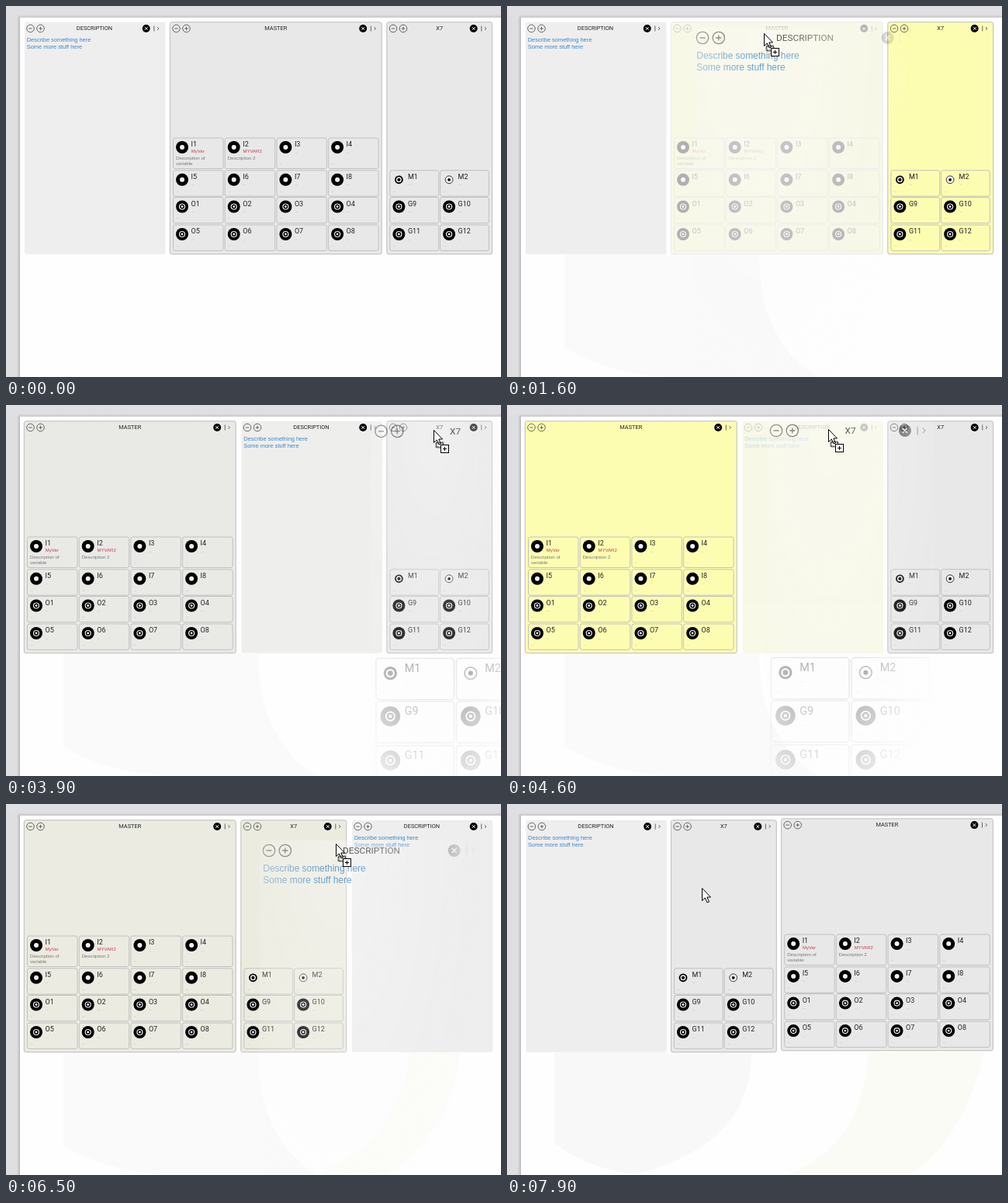
An HTML page for the animation above (8000 ms loop, 638 by 478 pixels).

```html
<!DOCTYPE html>
<html lang="en">
<head>
<meta charset="utf-8">
<title>Panel reordering</title>
<style>
  html, body { margin: 0; width: 100%; height: 100%; overflow: hidden; background: #dfdfe1; }
  svg { display: block; width: 638px; height: 478px; }
  text { font-family: Roboto, sans-serif; fill: #222; }
  .title { font-size: 7.4px; text-anchor: middle; }
  .label { font-size: 9px; }
  .note { font: 7.45px "Liberation Sans", Arial, sans-serif; fill: #3f86c4; }
  .var { font: 6px "Liberation Sans", Arial, sans-serif; fill: #bd3f4c; }
  .desc { font: 6.15px "Liberation Sans", Arial, sans-serif; fill: #777; }
  .dash { font: 5px "Liberation Sans", Arial, sans-serif; fill: #b4b4b4; }
</style>
</head>
<body>
<svg id="stage" viewBox="0 0 638 478">
  <defs>
    <clipPath id="pageClip"><rect x="18" y="15" width="620" height="463"/></clipPath>
    <radialGradient id="fade" gradientUnits="userSpaceOnUse" cx="0" cy="0" r="1">
      <stop offset="0" stop-color="#fff" stop-opacity=".85"/>
      <stop offset="1" stop-color="#fff" stop-opacity="0"/>
    </radialGradient>
    <mask id="ghostMask" maskUnits="userSpaceOnUse" x="-20" y="-20" width="500" height="540">
      <rect x="-20" y="-20" width="500" height="540" fill="url(#fade)"/>
    </mask>
    <linearGradient id="edgeX"><stop offset="0" stop-color="#dfdfe1"/><stop offset="1" stop-color="#b9b9bc"/></linearGradient>
    <linearGradient id="edgeY" x2="0" y2="1"><stop offset="0" stop-color="#e0e0e4"/><stop offset="1" stop-color="#c6c6c9"/></linearGradient>
  </defs>
  <rect width="638" height="478" fill="#dfdfe1"/>
  <rect width="638" height="11" fill="#e0e0e4"/>
  <rect x="14" y="14" width="4" height="464" fill="url(#edgeX)"/>
  <rect x="16" y="11" width="622" height="4" fill="url(#edgeY)"/>
  <rect x="18" y="15" width="620" height="463" fill="#fefefe"/>
  <g id="trails">
    <path d="M74 320V440Q130 474 210 478H400Q325 430 325 320Z" fill="#fafafa"/>
    <path d="M520 320H585Q575 420 490 478H400Q510 430 520 320Z" fill="#fcfcf8"/>
    <path d="M61 320V437Q105 470 165 477Q315 440 315 320Z" fill="#f8f8f8"/>
    <path d="M465 320H615Q590 430 520 478H360Q460 440 465 320Z" fill="#fbfbf6"/>
  </g>
  <g id="panels" clip-path="url(#pageClip)"></g>
  <g id="ghosts"></g>
  <g id="cursors">
    <path id="arrow" d="M0 0V16L3.8 12.5L6.6 18.5L9 17.5L6.3 11.5H11Z" fill="#fff" stroke="#000"/>
    <g id="drag">
      <path d="M0 0V16L3.8 12.5L6.6 18.5L9 17.5L6.3 11.5H11Z" fill="#fff" stroke="#000"/>
      <rect x="3" y="16" width="9" height="6" fill="none" stroke="#000" stroke-width="2" stroke-dasharray="1 1"/>
      <rect x="9" y="19" width="10" height="10" fill="#fff" stroke="#000"/>
      <path d="M11.5 24H16.5M14 21.5V26.5" stroke="#000"/>
    </g>
    <path id="beam" d="M-3 -8H-1L0 -7L1 -8H3M0 -7V7M-3 8H-1L0 7L1 8H3" fill="none" stroke="#000" stroke-width="1.2"/>
    <path id="move" d="M0 -10.5L4 -6H1V-1H6V-4L10.5 0L6 4V1H1V6H4L0 10.5L-4 6H-1V1H-6V4L-10.5 0L-6 -4V-1H-1V-6H-4Z" fill="#000" stroke="#fff" stroke-width=".8"/>
  </g>
</svg>
<script>
const $ = id => document.getElementById(id);
const LOOP = 8000, FRAME = 100, SWAP = 400, TOP = 20.5, HEIGHT = 299.5, GAP = 6, ZOOM = 1.6;
const GREY = [232, 232, 232], PALE = [238, 238, 238], YELLOW = [253, 253, 178], HOVER = [236, 236, 180];

const specs = {
  M: { title: 'MASTER', width: 273.5, x0: 4.5, pitch: 66.7, cell: 64.5,
       rows: ['I1 I2 I3 I4', 'I5 I6 I7 I8', 'O1 O2 O3 O4', 'O5 O6 O7 O8'] },
  X: { title: 'X7', width: 136.5, x0: 4.4, pitch: 64.7, cell: 62.8,
       rows: ['', 'M1 M2', 'G9 G10', 'G11 G12'] },
  D: { title: 'DESCRIPTION', width: 182, rows: [] }
};
const rowTops = [149.5, 191.3, 226, 261.5];
const extras = { I1: ['MyVar', 'Description of', 'variable'], I2: ['MYVAR2', 'Description 2'] };

const text = (cls, x, y, s) => `<text class="${cls}" x="${x}" y="${y}">${s}</text>`;
const disc = (x, y, r, fill) => `<circle cx="${x}" cy="${y}" r="${r}" fill="${fill}"/>`;

function icon(name, x, y) {
  const rings = (...radii) => radii.map((r, i) => disc(x, y, r, i % 2 ? '#f2f2f2' : '#000')).join('');
  if (name === 'M1') return rings(5.4, 3.5, 2.1);
  if (name === 'M2') return `<circle cx="${x}" cy="${y}" r="4.9" fill="#f6f6f6" stroke="#222" stroke-width=".9"/>` + disc(x, y, 1.9, '#000');
  return name[0] === 'I' ? rings(8, 3) : rings(8, 4.1, 2.9, 1.4);
}

function cell(name, x, y, w, h) {
  const [variable, ...lines] = extras[name] || [];
  let s = `<rect x="${x}" y="${y}" width="${w}" height="${h}" rx="2.5" fill="none" stroke="#bcbcbc" stroke-width=".9"/>`;
  s += icon(name, x + 11.5, y + 12) + text('label', x + 23, y + 11, name);
  s += variable ? text('var', x + 23.3, y + 19.2, variable) : text('dash', x + 23.5, y + 20.5, '--');
  return s + (lines.length ? lines.map((l, i) => text('desc', x + 3.5, y + 28 + 7 * i, l)).join('')
                           : text('dash', x + 4, y + h - 4.5, '--'));
}

function markup(id, ghost) {
  const { title, width: w, rows, x0, pitch, cell: cw } = specs[id];
  const plain = id === 'D';
  const look = ghost ? 'fill="#fafafa" fill-opacity=".5"' : plain ? '' : 'stroke="#bdbdbd"';
  let s = `<rect class="bg" x="${plain ? 1 : .3}" y=".3" width="${w - .6}" height="${HEIGHT - .6}" rx="2.5" ${look}/>`;
  s += `<g fill="none" stroke="#444" stroke-width=".8"><circle cx="8.5" cy="8.5" r="4.8"/><circle cx="21.5" cy="8.5" r="4.8"/>
    <path d="M6.3 8.5H10.7M19.3 8.5H23.7M21.5 6.3V10.7"/>
    <path d="M${w - 14.2} 5V12M${w - 10} 6.5L${w - 8} 8.5L${w - 10} 10.5"/></g>`;
  s += disc(w - 24.3, 8.5, 5, '#000') +
    `<path d="M${w - 26.2} 6.6l3.8 3.8m0 -3.8l-3.8 3.8" stroke="#fff" stroke-width="1"/>`;
  s += text('title', w / 2, 10.8, title);
  if (plain) s += text('note', 3.7, 25.6, 'Describe something here') + text('note', 3.7, 34.6, 'Some more stuff here');
  rows.forEach((row, r) => row.split(' ').filter(Boolean).forEach((name, c) => {
    s += cell(name, x0 + c * pitch, rowTops[r], cw, r ? 33.3 : 39.5);
  }));
  return s;
}

function group(parent, html) {
  const g = document.createElementNS('http://www.w3.org/2000/svg', 'g');
  g.innerHTML = html;
  return parent.appendChild(g);
}

const panels = {}, ghosts = {};
for (const id of ['M', 'X', 'D']) panels[id] = group($('panels'), markup(id));
for (const id of ['D', 'X']) {
  ghosts[id] = group($('ghosts'), `<g transform="scale(${ZOOM})">${markup(id, true)}</g>`);
  ghosts[id].setAttribute('mask', 'url(#ghostMask)');
}

// hover: [panel, enter, leave]; grab: pointer offset inside the dragged picture
const drags = [
  { id: 'D', start: 1050, end: 2050, grab: [92.6, 7.6], hover: [['M', 1220, 2050]], swap: 2253, order: 'MDX' },
  { id: 'X', start: 3850, end: 4750, grab: [80.6, 11.6], hover: [['D', 4250, 4750]], swap: 4950, order: 'MXD' },
  { id: 'D', start: 6390, end: 7250, grab: [99.6, 4.6], hover: [['X', 6490, 6720], ['M', 6750, 7250]], swap: 7508, order: 'DXM' }
];

// time, x, y of the pointer
const path = [
  [100, 560, 44], [400, 330, 16], [800, 115, 28], [1000, 115, 28], [1100, 165, 30], [1600, 331, 35],
  [1800, 340, 43], [2600, 340, 43], [2900, 425, 36], [3400, 570, 32], [3800, 570, 32], [4600, 414, 31],
  [4900, 414, 31], [5600, 538, 44], [6100, 543, 26], [6300, 543, 26], [6500, 425, 51], [6800, 250, 48],
  [7100, 161, 43], [7400, 161, 43], [7900, 251, 108]
];

const ramp = (t, a, b) => Math.min(1, Math.max(0, (t - a) / (b - a)));
const smooth = k => k * k * (3 - 2 * k);
const swing = k => .5 - .5 * Math.cos(Math.PI * k);
const mix = (a, b, k) => a.map((v, i) => v + (b[i] - v) * k);
const place = (el, x, y) => el.setAttribute('transform', `translate(${x} ${y})`);
const show = (el, on) => el.style.display = on ? '' : 'none';

function pointer(t) {
  let i = 0;
  while (i < path.length - 2 && t >= path[i + 1][0]) i++;
  const k = ramp(t, path[i][0], path[i + 1][0]);
  return mix(path[i].slice(1), path[i + 1].slice(1), k);
}

function layout(order) {
  const pos = {};
  let x = 23;
  for (const id of order) { pos[id] = x; x += specs[id].width + GAP; }
  return pos;
}

function cursorKind(t) {
  if (t < 100) return '';
  if (drags.some(d => t >= d.start && t < d.end)) return 'drag';
  if (t >= 2050 && t < 2900) return 'beam';
  const onHeader = [[700, 1050], [3300, 3850], [5900, 6390]].some(([a, b]) => t >= a && t < b);
  return onHeader ? 'move' : 'arrow';
}

function render(t) {
  const [px, py] = pointer(t);
  const pos = layout('DMX');
  let lift = 0;
  for (const d of drags) {
    const next = layout(d.order), u = ramp(t, d.swap, d.swap + SWAP);
    // MASTER travels along a low arc whenever it changes places
    if (next.M !== pos.M) lift -= 30 * Math.sin(Math.PI * u);
    for (const id in pos) pos[id] += (next[id] - pos[id]) * swing(u);
  }

  for (const id in panels) {
    let tint = 0, over = 0;
    for (const d of drags) {
      if (d.id !== id) tint += smooth(ramp(t, d.start, d.start + 500)) - smooth(ramp(t, d.end, d.end + 300));
      for (const [target, a, b] of d.hover)
        if (target === id) over += ramp(t, a, a + 250) - ramp(t, b, b + 250);
    }
    const base = id === 'D' ? PALE : GREY;
    const fill = mix(mix(base, YELLOW, tint), HOVER, over).map(Math.round);
    panels[id].querySelector('.bg').setAttribute('fill', `rgb(${fill})`);
    panels[id].setAttribute('opacity', 1 - .7 * over);
    place(panels[id], pos[id], TOP + (id === 'M' ? lift : 0));
  }

  const active = drags.find(d => t >= d.start && t < d.end);
  for (const id in ghosts) show(ghosts[id], active && active.id === id);
  if (active) {
    const [gx, gy] = active.grab;
    place(ghosts[active.id], px - gx, py - gy);
    $('fade').setAttribute('gradientTransform', `translate(${gx} ${gy}) scale(190 520)`);
  }

  const kind = cursorKind(t);
  for (const el of $('cursors').children) show(el, el.id === kind);
  place($('cursors'), Math.round(px) + .5, Math.round(py) + .5);

  const trails = $('trails').children;
  show(trails[0], t >= 1500 && t < 7000);
  show(trails[1], t >= 4700 && t < 7000);
  show(trails[2], t >= 7300);
  show(trails[3], t >= 7000);
}

const origin = performance.now();
function tick() {
  const t = (performance.now() - origin) % LOOP;
  render(Math.floor(t / FRAME) * FRAME);
  requestAnimationFrame(tick);
}
tick();
</script>
</body>
</html>
```
